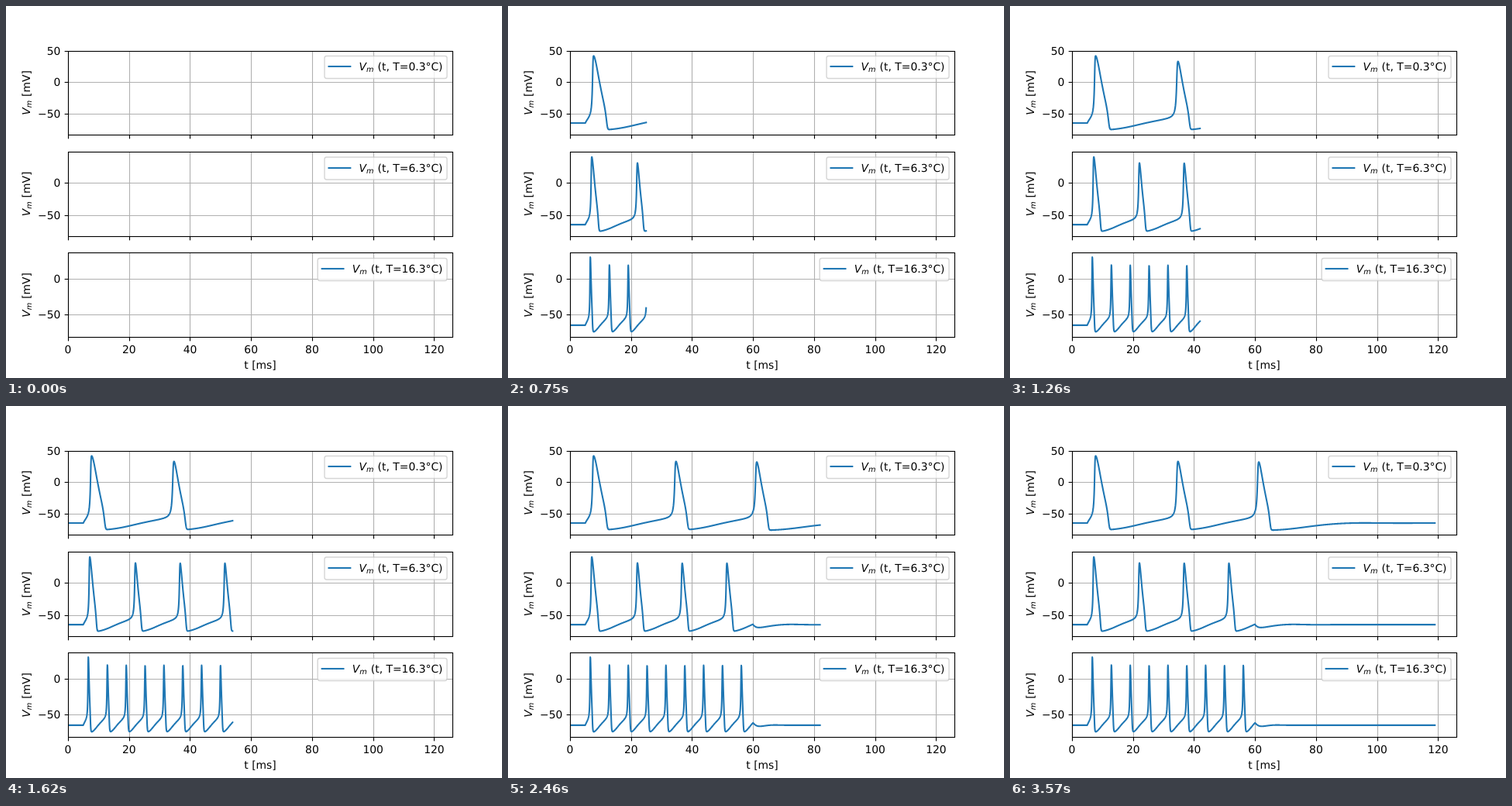
These frames come from a looping animation (640 px wide and 480 px high, 3600 ms). An HTML page:

```html
<!DOCTYPE html>
<html>
<head>
<meta charset="utf-8">
<title>Membrane potential</title>
<style>
html, body { margin: 0; width: 100%; height: 100%; overflow: hidden; background: #fff; }
svg { display: block; }
text { font: 13.89px "DejaVu Sans", sans-serif; text-rendering: geometricPrecision; white-space: pre; }
.var { font-style: oblique; }
.sub { font-size: 9.72px; }
.grid { stroke: #b0b0b0; stroke-width: 1.11; }
.axis { stroke: #000; stroke-width: 1.11; fill: none; }
.trace { stroke: #1f77b4; stroke-width: 2.083; stroke-linecap: square; stroke-linejoin: round; fill: none; }
.legend { fill: #fff; stroke: #ccc; stroke-width: 1.39; opacity: .8; }
</style>
</head>
<body>
<svg id="stage" width="640" height="480"></svg>
<script>
const LEFT = 80, WIDTH = 496, TOP = 57.6, HEIGHT = 108.706, PITCH = 130.447;
const X_MAX = 126, DURATION = 120, FRAME_MS = 30;
const SUBSTEPS = 10, DT = 0.005, SAMPLES_PER_MS = 1 / (SUBSTEPS * DT);
const PANELS = [
  { temp: 0.3, ticks: [50, 0, -50] },
  { temp: 6.3, ticks: [0, -50] },
  { temp: 16.3, ticks: [0, -50] },
];

const snap = v => Math.floor(v + 0.5) + 0.5;
const line = (cls, x1, y1, x2, y2) =>
  `<line class="${cls}" x1="${x1}" y1="${y1}" x2="${x2}" y2="${y2}"/>`;
const text = (x, y, s, anchor = 'start', attrs = '') =>
  `<text x="${x}" y="${y}" text-anchor="${anchor}" ${attrs}>${s}</text>`;
const vm = (x, y) => text(x, y, 'V', 'start', 'class="var"') +
  text(x + 9.5, y + 2.3, 'm', 'start', 'class="var sub"');

// Opening and closing rates of the Hodgkin-Huxley gates m, h and n
const rates = v => [
  [0.1 * (v + 40) / (1 - Math.exp(-(v + 40) / 10)), 4 * Math.exp(-(v + 65) / 18)],
  [0.07 * Math.exp(-(v + 65) / 20), 1 / (1 + Math.exp(-(v + 35) / 10))],
  [0.01 * (v + 55) / (1 - Math.exp(-(v + 55) / 10)), 0.125 * Math.exp(-(v + 65) / 80)],
];

function simulate(temp) {
  const phi = 3 ** ((temp - 6.3) / 10);
  let v = -65, gates = rates(v).map(([a, b]) => a / (a + b));
  const samples = [];
  for (let i = 0; i < DURATION / DT; i++) {
    if (i % SUBSTEPS === 0) samples.push(v);
    const t = i * DT, [m, h, n] = gates;
    const stimulus = t >= 5 && t < 60 ? 10 : 0;
    const current = 120 * m ** 3 * h * (v - 50) + 36 * n ** 4 * (v + 77) + 0.3 * (v + 54.387);
    gates = rates(v).map(([a, b], k) => {
      const rest = a / (a + b);
      return rest + (gates[k] - rest) * Math.exp(-phi * (a + b) * DT);
    });
    v += DT * (stimulus - current);
  }
  return samples;
}

const traces = [];

function panel({ temp, ticks }, row) {
  const samples = simulate(temp);
  const high = Math.max(...samples) * 1.2, low = Math.min(...samples) * 1.1;
  const scale = HEIGHT / (high - low);
  const top = TOP + row * PITCH, bottom = top + HEIGHT, y0 = snap(top), y1 = snap(bottom);
  const x0 = snap(LEFT), x1 = snap(LEFT + WIDTH);
  traces.push(samples.map((v, i) =>
    `${(i / SAMPLES_PER_MS * WIDTH / X_MAX).toFixed(2)},${((high - v) * scale).toFixed(2)}`));

  let grid = '', axes = '', labels = '';
  for (let t = 0; t <= 120; t += 20) {
    const x = LEFT + t * WIDTH / X_MAX;
    grid += line('grid', snap(x), y0, snap(x), y1);
    axes += line('axis', snap(x), y1, snap(x), y1 + 4.86);
    if (row === 2) labels += text(x, 448, t, 'middle');
  }
  for (const v of ticks) {
    const y = top + (high - v) * scale;
    grid += line('grid', x0, snap(y), x1, snap(y));
    axes += line('axis', x0 - 4.86, snap(y), x0, snap(y));
    labels += text(70.3, Math.round(y + 5), String(v).replace('-', '−'), 'end');
  }
  axes += `<rect class="axis" x="${x0}" y="${y0}" width="${x1 - x0}" height="${y1 - y0}"/>`;

  labels += `<g transform="translate(31 ${top + HEIGHT / 2 + 28.8}) rotate(-90)">` +
    vm(0, 0) + text(19.4, 0, ' [mV]') + '</g>';

  const shift = temp >= 10 ? 8.84 : 0, boxX = 411 - shift, baseline = Math.round(top + 25.7);
  const legendY = Math.round(top + 20.7);
  const legend = `<rect class="legend" x="${boxX}" y="${top + 6.94}" width="${569.06 - boxX}" height="29" rx="2.78"/>` +
    line('trace', boxX + 5.5, legendY, boxX + 33.3, legendY) +
    vm(boxX + 44.5, baseline) + text(563.5, baseline, ` (t, T=${temp}°C)`, 'end');

  return grid +
    `<svg x="${LEFT}" y="${top}" width="${WIDTH}" height="${HEIGHT}"><polyline class="trace live"/></svg>` +
    axes + labels + legend;
}

const stage = document.getElementById('stage');
stage.innerHTML = PANELS.map(panel).join('') + text(328, 468, 't [ms]', 'middle');
const lines = stage.querySelectorAll('.live');

let shown = -1;
function draw() {
  const ms = Math.floor(performance.now() / FRAME_MS) % DURATION;
  if (ms !== shown) {
    shown = ms;
    lines.forEach((el, i) =>
      el.setAttribute('points', traces[i].slice(0, ms * SAMPLES_PER_MS).join(' ')));
  }
  requestAnimationFrame(draw);
}
draw();
</script>
</body>
</html>
```
